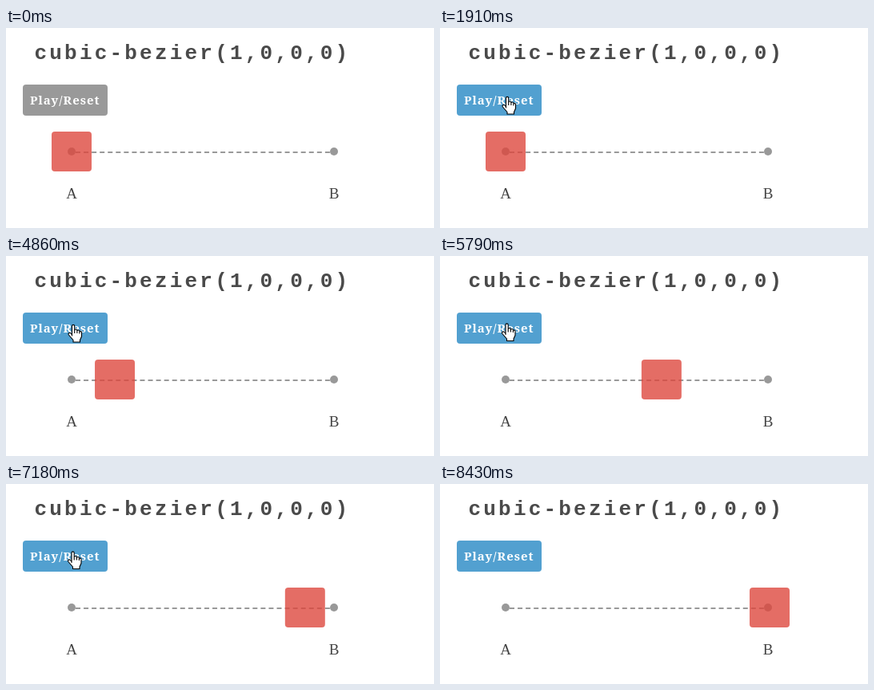
Animation, 535 px wide and 251 px high, one loop 9.14 s. Source, as an HTML page:

```html
<!DOCTYPE html>
<html lang="en">
<head>
<meta charset="utf-8">
<title>cubic-bezier</title>
<style>
  html, body { margin: 0; width: 100%; height: 100%; overflow: hidden; background: #fff; }
  svg { display: block; width: 100%; height: 100%; }
  .title { font: bold 26px "Liberation Mono", monospace; letter-spacing: 3.2px; fill: #4a4a4a; }
  .caption { font: bold 15px "Noto Serif", serif; letter-spacing: 1px; fill: #fff; }
  .label { font: 19px "Liberation Serif", serif; fill: #444; text-anchor: middle; }
</style>
</head>
<body>
<svg viewBox="0 0 535 251">
  <text class="title" x="35.5" y="39">cubic-bezier(1,0,0,0)</text>
  <rect id="button" x="21" y="71" width="106" height="39" rx="4"/>
  <text class="caption" x="30" y="96">Play/Reset</text>
  <path d="M87 156H405" stroke="#999" stroke-width="2" stroke-dasharray="6 4.06"/>
  <g fill="#999">
    <circle cx="82" cy="155" r="5"/>
    <circle cx="410" cy="155" r="5"/>
  </g>
  <text class="label" x="82" y="214">A</text>
  <text class="label" x="410" y="214">B</text>
  <rect id="box" y="130" width="50" height="50" rx="4" fill="#de493f" fill-opacity=".8"/>
  <path id="hand" fill="#fff" stroke="#000" stroke-width="1.1" stroke-linejoin="round"
    d="M5 14V2a1.6 1.6 0 0 1 3.2 0V7.5a1.6 1.6 0 0 1 3.2 .2V8.3a1.5 1.5 0 0 1 3 .3v.7a1.4 1.4 0 0 1 2.6 1V15l-2 4.5V22H6.5V19.5L.9 13a1.6 1.6 0 0 1 2.5-2L5 12.8zM8.2 7.5V11M11.4 8V11M14.4 9V11.5"/>
</svg>
<script>
  const LOOP = 9140, TICK = 77.5, PHASE = 52.5;
  const START = 1862.5, DURATION = 5985;
  const FROM = 57, TRAVEL = 330;

  // Pointer path: time, x, y
  const path = [
    [205, 190, 240], [890, 80, 88], [1055, 80, 88], [1215, 77.5, 87.5],
    [1445, 77.5, 87.5], [1525, 77.5, 86], [5620, 77.5, 86], [5700, 77, 84.5],
    [7400, 77, 84.5], [8110, 470, 256]
  ];

  const [button, box, hand] = ["button", "box", "hand"].map(id => document.getElementById(id));
  const clamp = v => Math.min(1, Math.max(0, v));
  const smooth = v => v * v * (3 - 2 * v);

  // cubic-bezier(1,0,0,0): x = 0.5 + 4(s - 0.5)^3, y = s^3
  const ease = x => (0.5 + Math.cbrt((x - 0.5) / 4)) ** 3;

  function pointer(t) {
    const i = path.findIndex(k => k[0] > t);
    if (i < 1) return null;
    const [t0, x0, y0] = path[i - 1], [t1, x1, y1] = path[i];
    const p = smooth((t - t0) / (t1 - t0));
    return [x0 + (x1 - x0) * p, y0 + (y1 - y0) * p];
  }

  function draw(time) {
    // The motion is sampled at a steady 77.5 ms
    const t = Math.floor((time - PHASE + 3) / TICK) * TICK + PHASE;
    const at = pointer(t);
    hand.setAttribute("visibility", at ? "visible" : "hidden");
    if (at) hand.setAttribute("transform", `translate(${at})`);
    button.setAttribute("fill", t > 700 ? "#52a0d0" : "#999");
    box.setAttribute("x", FROM + TRAVEL * ease(clamp((t - START) / DURATION)));
  }

  const origin = performance.now();
  function frame() {
    draw((performance.now() - origin) % LOOP);
    requestAnimationFrame(frame);
  }
  frame();
</script>
</body>
</html>
```
